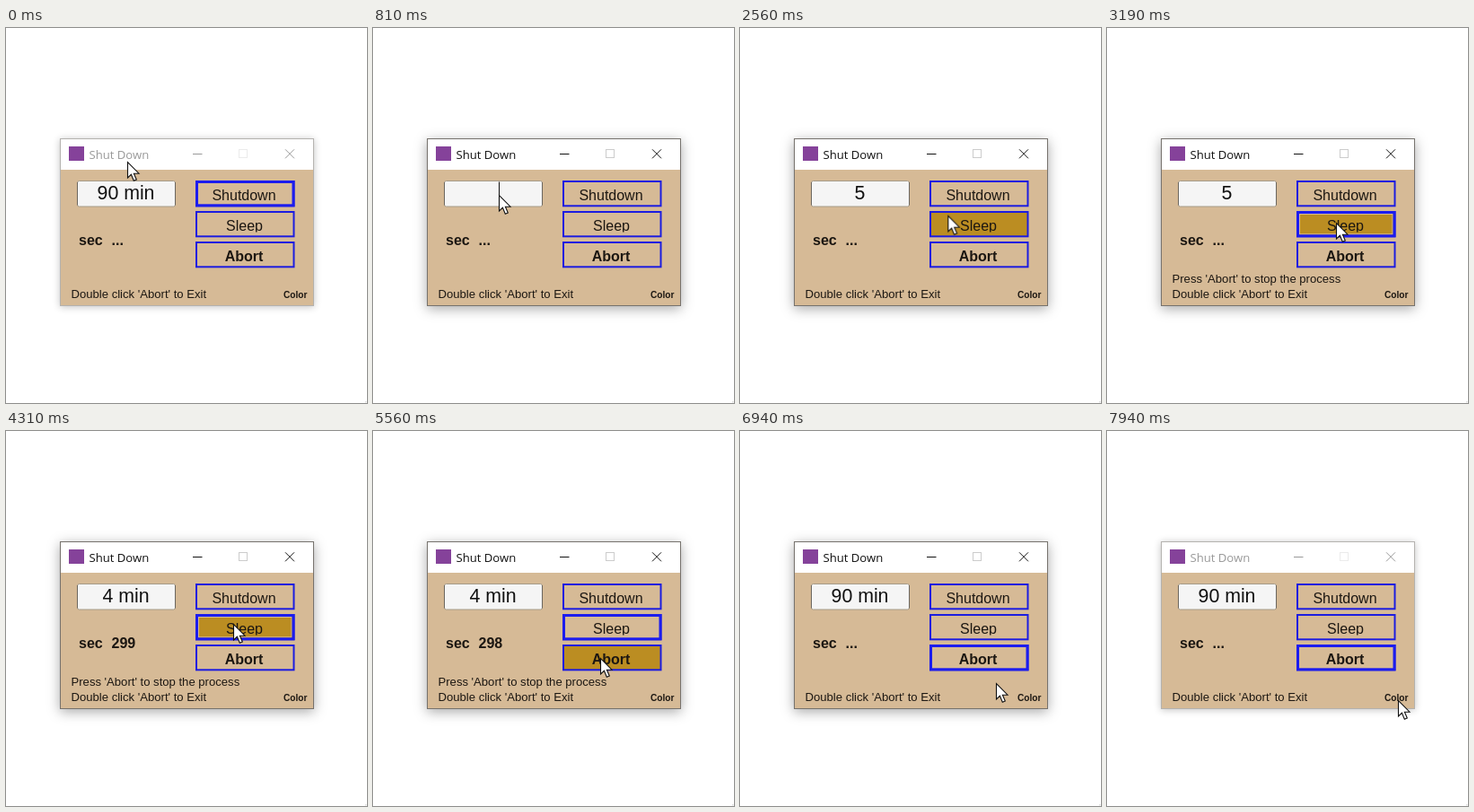
Animation of 402x418 px, one loop 8000 ms. Source, as an HTML page:

```html
<!DOCTYPE html>
<html lang="en">
<head>
<meta charset="utf-8">
<title>Shut Down</title>
<style>
html, body { margin: 0; width: 100%; height: 100%; overflow: hidden; background: #fff; }
svg { display: block; position: absolute; left: 0; top: 0; }
.shadow { position: absolute; left: 60px; top: 123px; width: 283px; height: 187px; }
.shadow.live { box-shadow: 0 3px 13px rgba(0, 0, 0, .34); }
.shadow.idle { box-shadow: 0 1px 8px rgba(0, 0, 0, .24); }

text { font-family: "Liberation Sans", Arial, sans-serif; fill: #1c1712; }
.title { font: 13.1px "Open Sans", "Noto Sans", sans-serif; }
.value { font-size: 21.3px; text-anchor: middle; fill: #111; }
.label { font-size: 16px; text-anchor: middle; }
.bold { font-weight: bold; }
.sec { font-size: 16px; font-weight: bold; }
.hint { font-size: 13.1px; }
.frame { fill: none; stroke: #1c1ce0; stroke-width: 2; }
.focus { fill: none; stroke: #1c1cee; stroke-width: 3; }
.hover { fill: #bb8d22; }
.glyphs { fill: none; stroke-width: 1; }

/* Every layer shares one 8 s timeline of hard switches. */
.t { animation: 8s step-end infinite; }
.idle { animation-name: idle; }
.live { animation-name: live; }
.initial { animation-name: initial-value; }
.typed { animation-name: typed; }
.min5 { animation-name: min5; }
.min4 { animation-name: min4; }
.dots { animation-name: dots; }
.s299 { animation-name: s299; }
.s298 { animation-name: s298; }
.running { animation-name: running; }
.focus-shutdown { animation-name: focus-shutdown; }
.focus-abort { animation-name: focus-abort; }
.hover-sleep { animation-name: hover-sleep; }
.hover-abort { animation-name: hover-abort; }
.editing { animation-name: editing; }
.caret { animation: blink 1.06s .65s step-end infinite; }

@keyframes idle { 0% { opacity: 1 } 3.9% { opacity: 0 } 95.4%, 100% { opacity: 1 } }
@keyframes live { 0% { opacity: 0 } 3.9% { opacity: 1 } 95.4%, 100% { opacity: 0 } }
@keyframes initial-value { 0% { opacity: 1 } 8.1% { opacity: 0 } 73.75%, 100% { opacity: 1 } }
@keyframes typed { 0% { opacity: 0 } 18% { opacity: 1 } 41.3%, 100% { opacity: 0 } }
@keyframes min5 { 0% { opacity: 0 } 41.3% { opacity: 1 } 53.1%, 100% { opacity: 0 } }
@keyframes min4 { 0% { opacity: 0 } 53.1% { opacity: 1 } 73.75%, 100% { opacity: 0 } }
@keyframes dots { 0% { opacity: 1 } 41.3% { opacity: 0 } 73.75%, 100% { opacity: 1 } }
@keyframes s299 { 0% { opacity: 0 } 53.1% { opacity: 1 } 65.6%, 100% { opacity: 0 } }
@keyframes s298 { 0% { opacity: 0 } 65.6% { opacity: 1 } 73.75%, 100% { opacity: 0 } }
@keyframes running { 0% { opacity: 0 } 36.25% { opacity: 1 } 73.75%, 100% { opacity: 0 } }
@keyframes focus-shutdown { 0% { opacity: 1 } 8.1%, 100% { opacity: 0 } }
@keyframes focus-abort { 0% { opacity: 0 } 73.75%, 100% { opacity: 1 } }
@keyframes hover-sleep { 0% { opacity: 0 } 31% { opacity: 1 } 60.4%, 100% { opacity: 0 } }
@keyframes hover-abort { 0% { opacity: 0 } 61% { opacity: 1 } 80%, 100% { opacity: 0 } }
@keyframes editing { 0% { opacity: 0 } 8.1% { opacity: 1 } 36.25%, 100% { opacity: 0 } }
@keyframes blink { 0% { opacity: 1 } 50%, 100% { opacity: 0 } }

.pointer { animation: move 8s linear infinite; }
.shown { animation-name: shown; }
@keyframes shown { 0% { opacity: 1 } 17.5% { opacity: 0 } 25.6%, 100% { opacity: 1 } }
@keyframes move {
  0%, 1% { transform: translate(135px, 149px) }
  8%, 25.6% { transform: translate(140px, 186px) }
  33.75% { transform: translate(256px, 215px) }
  37%, 46% { transform: translate(255px, 217px) }
  53%, 58% { transform: translate(253px, 215px) }
  63%, 78% { transform: translate(253px, 253px) }
  82%, 87% { transform: translate(285px, 281px) }
  90.6% { transform: translate(312px, 308px) }
  93.75%, 100% { transform: translate(324px, 300px) }
}
</style>
</head>
<body>
<div class="shadow t idle"></div>
<div class="shadow t live"></div>
<svg width="402" height="418" viewBox="0 0 402 418">
  <defs>
    <clipPath id="sleep-clip"><rect x="213" y="206" width="107" height="21.5"/></clipPath>
    <g id="window-buttons" class="glyphs">
      <path d="M208 140.5h10.5M311 135.3l10 10M321 135.3l-10 10"/>
    </g>
  </defs>

  <rect x="60" y="123" width="283" height="187" fill="#fff"/>
  <rect x="61" y="158" width="281" height="151" fill="#d6ba96"/>
  <rect x="70" y="132" width="17" height="16" fill="#85429a"/>

  <g class="t idle">
    <rect x="60.5" y="123.5" width="282" height="186" fill="none" stroke="#b4b2af"/>
    <text class="title" x="92.5" y="146" style="fill:#999">Shut Down</text>
    <use href="#window-buttons" stroke="#999"/>
    <rect x="259.5" y="135.5" width="9" height="9" fill="none" stroke="#ebebeb"/>
  </g>
  <g class="t live">
    <rect x="60.5" y="123.5" width="282" height="186" fill="none" stroke="#76726d"/>
    <text class="title" x="92.5" y="146" style="fill:#111">Shut Down</text>
    <use href="#window-buttons" stroke="#111"/>
    <rect x="259.5" y="135.5" width="9" height="9" fill="none" stroke="#ccc"/>
  </g>

  <rect x="79.5" y="170.5" width="109" height="28.5" rx="2" fill="#f5f5f5" stroke="#a59a88"/>
  <path d="M79.5 172v25.5M188.5 172v25.5" stroke="#6b665f"/>
  <text class="value t initial" x="133.5" y="191">90 min</text>
  <text class="value t typed" x="133.5" y="191">5</text>
  <text class="value t min5" x="133.5" y="191">5 min</text>
  <text class="value t min4" x="133.5" y="191">4 min</text>
  <g class="t editing"><path class="caret" d="M140.5 171.5v24.5" stroke="#111"/></g>

  <rect class="hover t hover-sleep" x="213" y="206" width="107" height="26"/>
  <rect class="hover t hover-abort" x="213" y="240" width="107" height="26"/>
  <rect class="frame" x="212" y="171" width="108.5" height="27.3"/>
  <rect class="frame" x="212" y="205" width="108.5" height="27.3"/>
  <rect class="frame" x="212" y="239" width="108.5" height="27.3"/>
  <rect class="focus t focus-shutdown" x="212.5" y="171.5" width="107.5" height="26.3"/>
  <g class="t running">
    <rect x="214.5" y="207.5" width="103.5" height="22.3" fill="none" stroke="#d6ba96"/>
    <rect class="focus" x="212.5" y="205.5" width="107.5" height="26.3"/>
  </g>
  <rect class="focus t focus-abort" x="212.5" y="239.5" width="107.5" height="26.3"/>
  <text class="label" x="265" y="192">Shutdown</text>
  <g clip-path="url(#sleep-clip)"><text class="label" x="265.5" y="226">Sleep</text></g>
  <text class="label bold" x="265" y="260">Abort</text>

  <text class="sec" x="81" y="242">sec</text>
  <text class="sec t dots" x="117.5" y="242">...</text>
  <text class="sec t min5" x="117.5" y="242">300</text>
  <text class="sec t s299" x="117.5" y="242">299</text>
  <text class="sec t s298" x="117.5" y="242">298</text>

  <text class="hint t running" x="72.5" y="284">Press 'Abort' to stop the process</text>
  <text class="hint" x="72.5" y="301">Double click 'Abort' to Exit</text>
  <text class="bold" x="309" y="301" font-size="10.1">Color</text>

  <rect x="400" y="416" width="1.5" height="1.5" fill="#ddd"/>

  <g class="t shown">
    <path class="pointer" d="M.5 .5V18L4.4 14.3L7.3 21.2L10.3 20L7.4 13.2H13Z" fill="#fff" stroke="#111" stroke-width="1.1"/>
  </g>
</svg>
</body>
</html>
```
